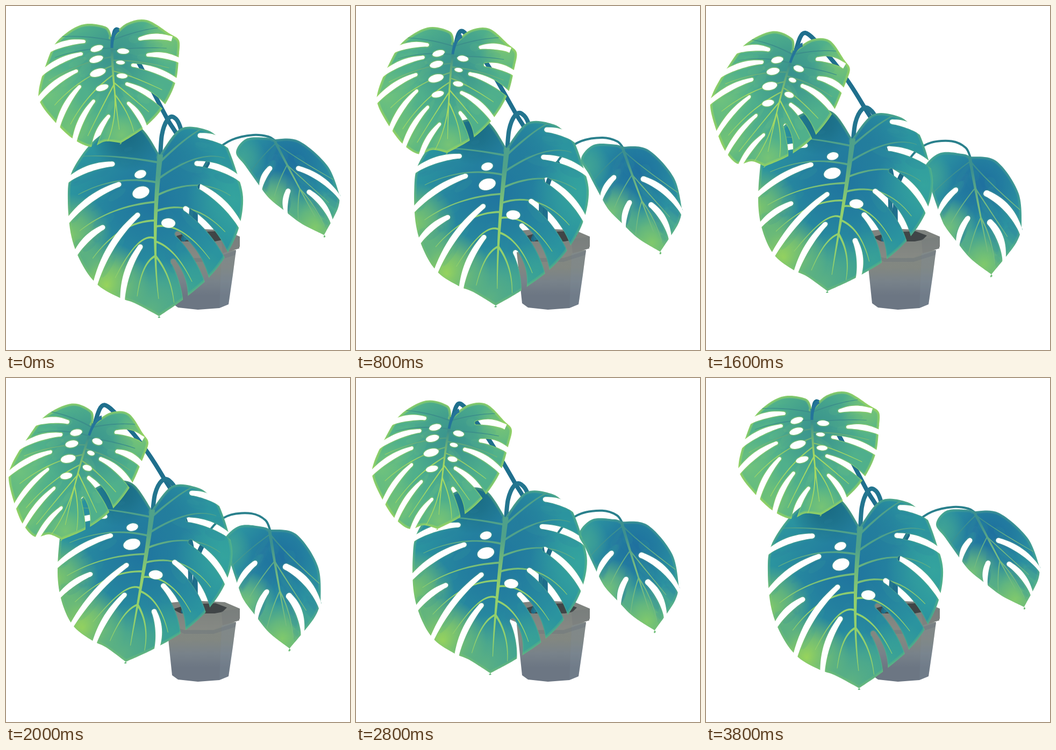
These frames come from a looping animation (640x640 px, 3900 ms). An HTML page with a canvas:

```html
<!DOCTYPE html>
<html lang="en">
<head>
<meta charset="utf-8">
<title>Swaying monstera</title>
<style>
  html, body { margin: 0; width: 100%; height: 100%; overflow: hidden; background: #fff; }
  canvas { display: block; width: 640px; height: 640px; }
</style>
</head>
<body>
<canvas id="stage" width="640" height="640"></canvas>
<script>
const SIZE = 640, STEP = 100, STEPS = 39, TAU = Math.PI * 2;
const view = document.getElementById('stage').getContext('2d');
const layer = document.createElement('canvas');
layer.width = layer.height = SIZE;
const ink = layer.getContext('2d');

// A leaf is a few outline points (third value 1 = sharp), a midrib,
// and slots from inner to outer end; the veins follow from the slots.
// sway gives the shift at full swing, u and v measured from the base.
const topLeaf = {
  sway: (u, v) => [-33 - .15 * u - .35 * v, 26 + .22 * u + .07 * v],
  base: '#50b08b', rim: '#a4dc58', rimAlpha: .42, gap: [3, 4.5], bow: .12, squash: .46, seed: 5,
  tones: ['#3f9f90', '#7cc878', '#49ad92', '#66bf83'], veins: ['#3c8f8a', '#a5d962'],
  rib: [197, 57, 196, 125, 211, 230], ribWidth: 3,
  edge: [[197, 57, 1], [225, 32], [262, 26], [304, 51], [322, 64], [322, 89, 1], [316, 140],
    [293, 188], [258, 226], [214, 255, 1], [185, 252], [158, 262], [126, 248], [97, 222],
    [66, 184], [61, 158], [74, 110], [95, 66], [140, 35], [185, 38]],
  left: [[145, 66, 86, 79], [140, 89, 70, 122], [131, 121, 62, 173], [137, 150, 97, 221],
    [163, 177, 128, 248], [191, 205, 164, 261]],
  right: [[249, 61, 301, 59], [264, 91, 318, 99], [236, 110, 317, 139], [225, 145, 294, 187],
    [228, 181, 258, 224]],
  holes: [[169, 79, 12], [168, 99, 13], [171, 124, 15], [179, 152, 12], [218, 84, 11], [213, 105, 8], [216, 130, 10]],
  blobs: [[205, 95, 85, '#31898f', .75], [202, 165, 50, '#3a9b91', .4], [80, 165, 60, '#7cca76', .7],
    [120, 230, 60, '#80cb6d', .7], [215, 240, 40, '#8fd067', .6], [300, 60, 50, '#8fd067', .6]]
};

const frontLeaf = {
  sway: (u, v) => [-14 - .01 * u - .0005 * Math.max(v, 0) ** 2, -30 + .04 * u - .055 * v + .0002 * u * v],
  base: '#2b949f', rim: '#86cc69', rimAlpha: .2, gap: [4.5, 4.5], bow: .14, squash: .68, seed: 11,
  tones: ['#23809f', '#2f9a9e', '#2878a0', '#38a397'], veins: ['#4fa18a', '#93d06c'],
  rib: [287, 276, 270, 430, 284, 545], ribWidth: 5,
  edge: [[286, 277, 1], [250, 226], [205, 225], [160, 254], [122, 310], [115, 360], [122, 430],
    [143, 483], [172, 520], [212, 543], [240, 553], [285, 577, 1], [330, 546], [378, 505],
    [412, 460], [434, 410], [441, 355], [428, 305], [412, 262], [403, 253, 1], [375, 231], [325, 228]],
  left: [[198, 294, 119, 321], [210, 332, 115, 400], [180, 412, 130, 460], [245, 389, 167, 514],
    [250, 448, 217, 542]],
  right: [[361, 241, 409, 256], [355, 293, 430, 318], [361, 336, 435, 407], [334, 377, 411, 466],
    [319, 424, 374, 511], [311, 475, 334, 547]],
  holes: [[250, 313, 11], [251, 347, 16], [302, 404, 13]],
  blobs: [[270, 365, 150, '#1f739f', .95], [310, 275, 80, '#22799c', .7], [225, 238, 70, '#17647f', .9],
    [425, 360, 90, '#38aa9d', .7], [350, 520, 70, '#44ab8f', .6], [122, 425, 75, '#80c76a', .95],
    [188, 520, 80, '#98d45c', 1], [270, 565, 95, '#62b57f', .9]]
};

const sideLeaf = {
  sway: (u, v) => [-8 + .08 * u - .34 * v, 32 + .1 * u + .18 * v],
  base: '#2c93a0', rim: '#7fca72', rimAlpha: .15, gap: [4.5, 3], bow: .16, squash: .5, seed: 23,
  tones: ['#23809f', '#319b9c', '#2475a0'], veins: ['#3c908f', '#77bc80'],
  rib: [499, 249, 530, 310, 575, 392], ribWidth: 2.6,
  edge: [[499, 248, 1], [545, 251], [598, 297], [621, 352, 1], [617, 378], [592, 426, 1],
    [550, 405], [517, 380], [490, 358], [472, 335, 1], [445, 297], [428, 272], [447, 247], [485, 245]],
  left: [[491, 302, 474, 338], [525, 344, 521, 384]],
  right: [[544, 302, 620, 355], [564, 346, 605, 398]],
  holes: [],
  blobs: [[530, 290, 90, '#1d6f9f', 1], [440, 285, 45, '#46a891', .8], [497, 360, 55, '#79c477', .9],
    [575, 412, 72, '#80c96c', 1], [612, 380, 40, '#48ac92', .7]]
};

// Stems run from the leaf to the pot; the swing fades along the way.
const stems = [
  { width: 9, color: '#1d6a86', tip: [0, 2], fade: 2, lift: 0,
    pts: [[375, 292], [357, 330], [351, 380], [330, 434]] },
  { width: 4, color: '#2a808c', tip: [-8, 32], fade: 2, lift: 0,
    pts: [[500, 250], [488, 243], [460, 240], [420, 249], [390, 270], [368, 300]] },
  { width: 8, color: '#1f6f8d', tip: [-33, 24], fade: 2, lift: -24,
    pts: [[199, 62], [209, 45], [248, 108], [275, 162], [300, 210], [330, 262], [350, 340], [353, 405]] },
  { width: 8, color: '#23758f', tip: [-14, -27], fade: 1, lift: 0,
    pts: [[287, 284], [290, 240], [300, 212], [312, 207], [325, 228], [340, 300], [345, 380], [334, 432]] }
];

const alpha = (hex, a) => hex + Math.round(a * 255).toString(16).padStart(2, '0');
const mix = (a, b, t) => a.map((v, i) => v + (b[i] - v) * t);

function random(seed) {
  return () => (seed = (seed * 16807) % 2147483647) / 2147483647;
}

function spline(pts, closed) {
  const path = new Path2D(), n = pts.length;
  const at = i => closed ? pts[(i + n) % n] : pts[Math.max(0, Math.min(n - 1, i))];
  path.moveTo(...pts[0]);
  for (let i = 0; i < (closed ? n : n - 1); i++) {
    const [a, b, c, d] = [at(i - 1), at(i), at(i + 1), at(i + 2)];
    path.bezierCurveTo(b[0] + (c[0] - a[0]) / 6, b[1] + (c[1] - a[1]) / 6,
      c[0] - (d[0] - b[0]) / 6, c[1] - (d[1] - b[1]) / 6, c[0], c[1]);
  }
  return path;
}

function polygon(pts) {
  const path = new Path2D();
  pts.forEach(([x, y], i) => i ? path.lineTo(x, y) : path.moveTo(x, y));
  path.closePath();
  return path;
}

function oval(warp, x, y, rx, ry, tilt = 0) {
  const c = Math.cos(tilt), s = Math.sin(tilt);
  return polygon(Array.from({ length: 24 }, (_, i) => {
    const u = rx * Math.cos(i * TAU / 24), v = ry * Math.sin(i * TAU / 24);
    return warp(x + u * c - v * s, y + u * s + v * c);
  }));
}

const curveAt = ([ax, ay, bx, by, cx, cy], t) =>
  mix(mix([ax, ay], [bx, by], t), mix([bx, by], [cx, cy], t), t);

// A curved strip whose half width runs from w0 to w1.
function strip(warp, curve, w0, w1, reach = 1, bulge = 0) {
  const [ax, ay, bx, by, cx, cy] = curve, left = [], right = [];
  for (let i = 0; i <= 16; i++) {
    const t = i / 16 * reach, [x, y] = curveAt(curve, t);
    const [dx, dy] = mix([bx - ax, by - ay], [cx - bx, cy - by], t);
    const w = (w0 + (w1 - w0) * t + bulge * Math.sin(Math.PI * Math.min(t, 1))) / Math.hypot(dx, dy);
    left.push(warp(x - dy * w, y + dx * w));
    right.unshift(warp(x + dy * w, y - dx * w));
  }
  return polygon(left.concat(right));
}

// Slots leave the midrib sideways and bend towards the tip.
function bend([x0, y0, x1, y1], bow) {
  const dx = x1 - x0, dy = y1 - y0, k = Math.sign(dx) * bow;
  return [x0, y0, (x0 + x1) / 2 + dy * k, (y0 + y1) / 2 - dx * k, x1, y1];
}

// One vein per lobe, running midway between neighbouring slots.
function sideVeins(rib, slots) {
  const n = slots.length;
  const all = [mix(slots[1], slots[0], 2), ...slots, mix(slots[n - 2], slots[n - 1], 2)];
  return all.slice(1).map((slot, i) => {
    const [ix, iy, ox, oy] = mix(all[i], slot, .5);
    return [...curveAt(rib, .05 + .62 * i / n), ix, iy, ...mix([ox, oy], [ix, iy], .2)];
  });
}

function wash(warp, x, y, r, color, a) {
  const [cx, cy] = warp(x, y);
  const g = ink.createRadialGradient(cx, cy, 0, cx, cy, r);
  g.addColorStop(0, alpha(color, a));
  g.addColorStop(.45, alpha(color, a * .65));
  g.addColorStop(1, alpha(color, 0));
  ink.fillStyle = g;
  ink.fillRect(cx - r, cy - r, r * 2, r * 2);
}

function brush(leaf, warp) {
  const rnd = random(leaf.seed);
  for (let i = 0; i < 70; i++) {
    const slots = rnd() < .5 ? leaf.left : leaf.right;
    const [ix, iy, ox, oy] = slots[Math.floor(rnd() * slots.length)];
    const [x, y] = mix([ix, iy], [ox, oy], rnd() * 1.4 - .4);
    ink.fillStyle = alpha(leaf.tones[i % leaf.tones.length], .13);
    ink.fill(oval(warp, x, y + rnd() * 40 - 20, 8 + rnd() * 16, 3 + rnd() * 6, Math.atan2(oy - iy, ox - ix)));
  }
}

function warpOf(leaf, swing) {
  const [x0, y0] = leaf.edge[0];
  return (x, y) => {
    const [dx, dy] = leaf.sway(x - x0, y - y0);
    return [x + dx * swing, y + dy * swing];
  };
}

function cut(leaf, warp, grow) {
  const [w0, w1] = leaf.gap.map(w => w + grow);
  for (const slot of [...leaf.left, ...leaf.right]) {
    ink.fill(strip(warp, bend(slot, leaf.bow), w0, w1, 1.15, 1.5));
    ink.fill(oval(warp, slot[0], slot[1], w0, w0));
  }
  for (const [x, y, r] of leaf.holes) {
    ink.fill(oval(warp, x, y, r + grow, r * leaf.squash + grow, x < leaf.rib[0] ? -.3 : .05));
  }
}

function drawLeaf(leaf, swing) {
  const warp = warpOf(leaf, swing), { rib } = leaf;
  const edge = spline(leaf.edge.flatMap(([x, y, sharp]) => Array(sharp ? 2 : 1).fill(warp(x, y))), true);

  ink.globalCompositeOperation = 'source-over';
  ink.clearRect(0, 0, SIZE, SIZE);
  ink.fillStyle = leaf.base;
  ink.fill(edge);

  ink.globalCompositeOperation = 'source-atop';
  for (const b of leaf.blobs) wash(warp, ...b);
  brush(leaf, warp);
  ink.strokeStyle = ink.fillStyle = alpha(leaf.rim, leaf.rimAlpha);
  for (const w of [9, 4]) {
    ink.lineWidth = w;
    ink.stroke(edge);
  }
  cut(leaf, warp, 1.5);

  const tint = ink.createLinearGradient(...warp(rib[0], rib[1]), ...warp(rib[4], rib[5]));
  tint.addColorStop(.15, leaf.veins[0]);
  tint.addColorStop(.5, leaf.veins[1]);
  ink.fillStyle = tint;
  ink.fill(strip(warp, rib, leaf.ribWidth, .5));
  for (const vein of [...sideVeins(rib, leaf.left), ...sideVeins(rib, leaf.right)]) {
    ink.fill(strip(warp, vein, leaf.ribWidth * .4, .5));
  }

  ink.globalCompositeOperation = 'destination-out';
  ink.fillStyle = '#000';
  cut(leaf, warp, 0);
  view.drawImage(layer, 0, 0);
}

function drawStems(swing) {
  view.lineCap = view.lineJoin = 'round';
  for (const { width, color, tip, fade, lift, pts } of stems) {
    view.lineWidth = width;
    view.strokeStyle = color;
    view.stroke(spline(pts.map(([x, y], i) => {
      const t = i / (pts.length - 1), k = (1 - t) ** fade;
      const rise = tip[1] * (lift ? k ** 3 : k) + lift * Math.sin(Math.PI * t) ** 2;
      return [x + tip[0] * k * swing, y + rise * swing];
    })));
  }
}

function fillPoly(color, ...pts) {
  view.fillStyle = color;
  view.fill(polygon(pts));
}

function shade(y0, y1, ...colors) {
  const g = view.createLinearGradient(0, y0, 0, y1);
  colors.forEach((c, i) => g.addColorStop(i / (colors.length - 1), c));
  return g;
}

function drawPot(swing) {
  fillPoly('#7f837f', [289, 427], [306, 418], [345, 414], [407, 417], [435, 429], [435, 448], [288, 448]);
  fillPoly('#404547', [310, 430], [340, 421], [390, 419], [411, 427], [400, 438], [325, 438]);
  drawStems(swing);
  fillPoly(shade(460, 565, '#838882', '#828781', '#78828a', '#6c7683', '#6c7683'),
    [299, 458], [428, 454], [422, 500], [414, 555], [397, 562], [357, 565], [320, 561], [309, 553]);
  fillPoly('#7b8c9c40', [401, 460], [428, 454], [422, 500], [414, 555], [397, 562]);
  fillPoly('#636d7a50', [300, 461], [332, 469], [386, 469], [428, 455], [427, 463], [386, 476], [332, 476]);
  fillPoly(shade(428, 468, '#7d827e', '#868984'),
    [288, 429], [335, 440], [378, 440], [435, 429], [434, 451], [403, 460], [386, 468], [331, 468], [288, 450]);
  fillPoly('#72777b60', [401, 434], [435, 429], [434, 451], [403, 460]);
}

function draw(step) {
  const phase = (step + .5) / STEPS * TAU;
  const swing = (1 - Math.cos(phase)) / 2 * 1.06;
  view.fillStyle = '#fff';
  view.fillRect(0, 0, SIZE, SIZE);
  drawPot(swing);
  for (const leaf of [sideLeaf, frontLeaf, topLeaf]) drawLeaf(leaf, swing);
  // The petiole hooks over the notch of the top leaf.
  view.fillStyle = '#24749a';
  view.fill(strip(warpOf(topLeaf, swing), [197, 78, 197, 50, 210, 44], 2.5, 3.5));
}

let last = -1;
function tick(now) {
  const step = Math.floor(now / STEP) % STEPS;
  if (step !== last) draw(last = step);
  requestAnimationFrame(tick);
}
draw(0);
requestAnimationFrame(tick);
</script>
</body>
</html>
```
